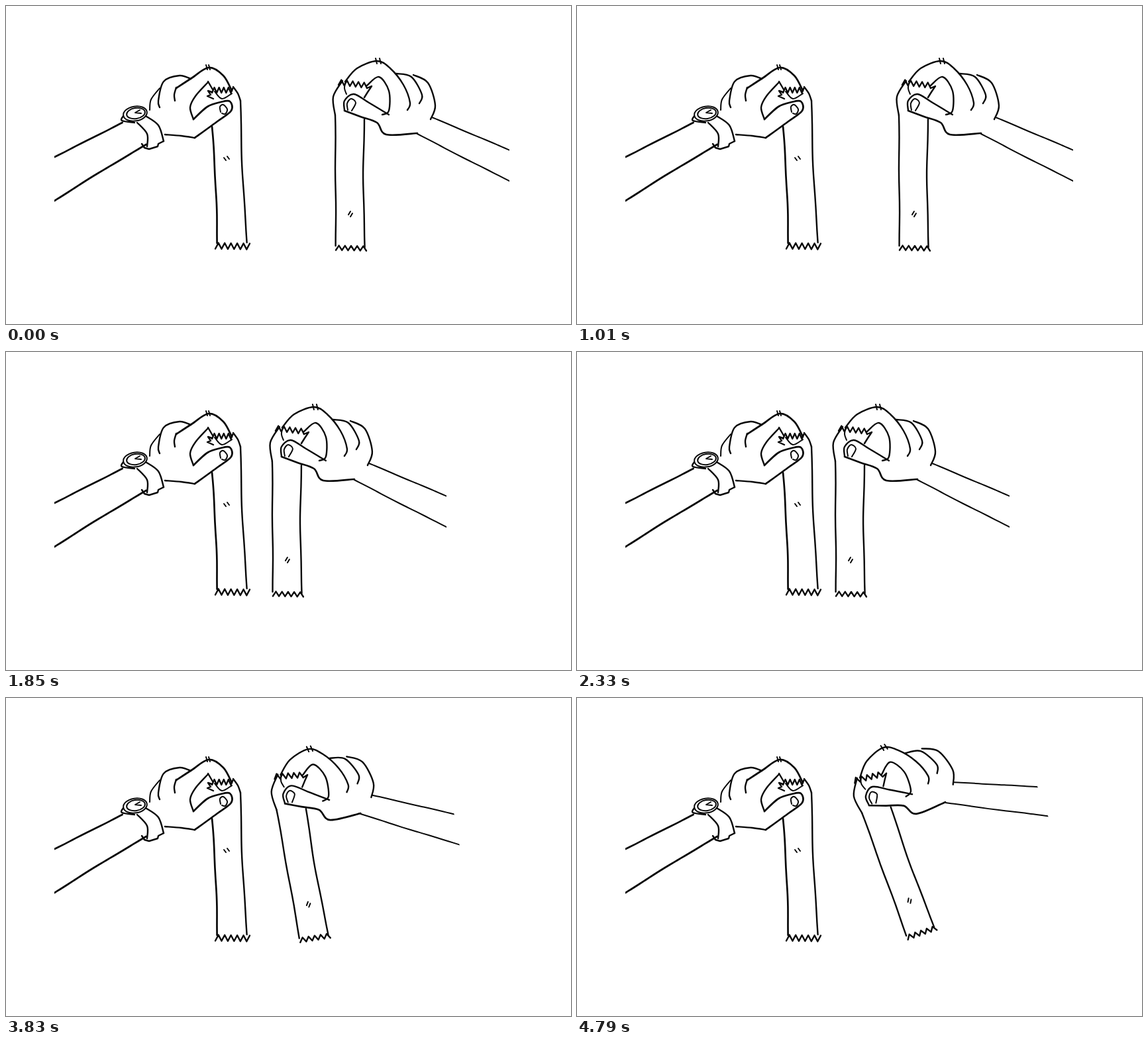
Recreate the animation shown at these times as an HTML page with a canvas. Size 853x480 px, loop 5390 ms.

```html
<!DOCTYPE html>
<html lang="en">
<head>
<meta charset="utf-8">
<title>Two hands, two strips</title>
<style>
  html, body { margin: 0; width: 100%; height: 100%; overflow: hidden; background: #fff; }
  canvas { display: block; }
</style>
</head>
<body>
<canvas id="stage" width="853" height="480"></canvas>
<script>
const ctx = document.getElementById('stage').getContext('2d');
const LOOP = 5390, STEP = 60;
const SLIDE = { start: 530, steps: 31, distance: -107 };
const SWING = { start: 2930, steps: 32, angle: -19.7 * Math.PI / 180, x: 490, y: 222, dx: 53.5, dy: -28.5 };
const BOLD = 2.7, INK = 2.4, FINE = 2;

function stroke(width, trace) {
  ctx.lineWidth = width;
  ctx.beginPath();
  trace();
  ctx.stroke();
}

// Smooth stroke through a few [x, y] points
function curve(width, ...p) {
  const at = i => p[Math.max(0, Math.min(p.length - 1, i))];
  stroke(width, () => {
    ctx.moveTo(...p[0]);
    for (let i = 0; i < p.length - 1; i++) {
      const [a, b, c, d] = [at(i - 1), at(i), at(i + 1), at(i + 2)];
      ctx.bezierCurveTo(b[0] + (c[0] - a[0]) / 6, b[1] + (c[1] - a[1]) / 6,
        c[0] - (d[0] - b[0]) / 6, c[1] - (d[1] - b[1]) / 6, c[0], c[1]);
    }
  });
}

const line = (width, ...points) =>
  stroke(width, () => points.forEach(point => ctx.lineTo(...point)));

const ellipse = (width, x, y, rx, ry) =>
  stroke(width, () => ctx.ellipse(x, y, rx, ry, -.16, 0, Math.PI * 2));

// Nearly straight hand-drawn edge, bowed sideways in the middle
function edge(width, [x0, y0], [x1, y1], bow = 0) {
  const parts = 12;
  curve(width, ...Array.from({ length: parts + 1 }, (_, i) => {
    const t = i / parts;
    return [x0 + (x1 - x0) * t + bow * Math.sin(Math.PI * t) + .4 * Math.sin(11 * t), y0 + (y1 - y0) * t];
  }));
}

// Torn edge with evenly spaced teeth, starting at the low side
function torn([x0, y0], [x1, y1], parts, height) {
  line(INK, ...Array.from({ length: parts + 1 }, (_, i) => {
    const t = i / parts, side = i % 2 ? -.5 : .5;
    return [x0 + (x1 - x0) * t, y0 + (y1 - y0) * t + side * height];
  }));
}

// Two short dashes side by side
function dashes(x, y, dx, dy, gap, rise = 0) {
  for (const k of [0, 1]) {
    line(FINE, [x + k * gap, y + k * rise], [x + k * gap + dx, y + k * rise + dy]);
  }
}

function drawWatch() {
  ellipse(FINE, 195, 162.5, 18, 11);
  ellipse(FINE, 196, 162, 14, 8);
  line(FINE, [202, 157], [195, 161], [204, 162]);
  curve(INK, [177, 166], [175, 173], [194, 176]);
  curve(INK, [211, 166], [230, 180], [238, 204]);
  curve(INK, [198, 176], [213, 193], [213, 212]);
  line(INK, [205, 208], [209, 214], [216, 216], [229, 212], [230, 208], [238, 204]);
}

function drawLeftHand() {
  edge(BOLD, [70, 229.5], [176, 176]);
  edge(BOLD, [70, 296], [212, 209], -2);
  drawWatch();
  // fingers
  curve(FINE, [217, 157], [219, 141], [232, 124]);
  curve(INK, [232, 153], [230, 143], [238, 114], [262, 105], [279, 110]);
  curve(INK, [255, 143], [254, 134], [257, 123]);
  curve(BOLD, [257, 124], [280, 109], [306, 93], [328, 105], [341, 128]);
  dashes(302, 89, 2, 7, 4);
  curve(INK, [305, 115], [286, 136], [278, 153], [283, 171]);
  curve(INK, [305, 114], [312, 126]);
  // thumb
  curve(BOLD, [283, 171], [304, 152], [324, 145], [338, 144], [340, 158], [318, 175], [285, 199]);
  curve(INK, [285, 199], [265, 196], [240, 194]);
  curve(FINE, [324, 160], [323, 152], [328, 149], [334, 156], [331, 163], [326, 162]);
  // strip
  line(INK, [313, 140], [304, 136], [309, 134], [305, 128], [311, 130]);
  torn([311, 127], [343, 127], 9, 8);
  curve(FINE, [315, 129], [326, 140], [341, 132]);
  curve(INK, [343, 122], [350, 132], [354, 143]);
  edge(INK, [354, 143], [364, 357], -2);
  edge(BOLD, [311, 182], [319, 358], 1.5);
  torn([316, 362], [368, 363], 11, 9);
  dashes(329, 229, 3, 4, 5, -2);
}

function drawRightHand() {
  edge(FINE, [643, 168], [764, 219]);
  edge(FINE, [621, 193], [764, 266], -1);
  // fingers
  curve(INK, [512, 114], [530, 94], [560, 83], [580, 94], [600, 119], [610, 146], [606, 157]);
  dashes(558, 79, 2, 8, 6);
  curve(INK, [545, 120], [563, 107], [578, 128], [578, 158], [568, 164]);
  curve(INK, [589, 102], [612, 107], [628, 134], [624, 147]);
  curve(INK, [615, 104], [637, 116], [648, 150], [641, 171]);
  // thumb
  curve(INK, [511, 157], [511, 143], [525, 133], [548, 146], [578, 164]);
  curve(BOLD, [511, 158], [535, 167], [560, 176], [574, 194], [621, 192]);
  curve(FINE, [516, 157], [515, 147], [521, 140], [528, 146], [522, 158]);
  // strip
  torn([502, 115], [545, 120], 10, 8);
  line(INK, [545, 124], [552, 121], [546, 130], [541, 138]);
  curve(FINE, [513, 113], [511, 124], [514, 133]);
  curve(INK, [508, 113], [494, 137], [497, 165]);
  edge(INK, [497, 165], [498, 362]);
  edge(INK, [541, 171], [542, 364], -2);
  torn([498, 365], [544, 366], 10, 7);
  dashes(520, 310, -3, 5, 3, 3);
}

// Timing curve with flat ends, solved by bisection
function ease(u, first, second) {
  let low = 0, high = 1;
  for (let i = 0; i < 24; i++) {
    const s = (low + high) / 2, r = 1 - s;
    const x = 3 * r * r * s * first + 3 * r * s * s * second + s * s * s;
    if (x < u) low = s; else high = s;
  }
  return low * low * (3 - 2 * low);
}

const turnEase = u => .67 * u + .33 * u * u * (3 - 2 * u);

function progress(time, { start, steps }) {
  const count = Math.floor((time - start) / STEP) + 1;
  return Math.max(0, Math.min(steps, count)) / steps;
}

function clipTo(x, width) {
  ctx.beginPath();
  ctx.rect(x, 0, width, 480);
  ctx.clip();
}

function draw(time) {
  ctx.fillStyle = '#fff';
  ctx.fillRect(0, 0, 853, 480);
  ctx.strokeStyle = '#080808';
  ctx.lineCap = ctx.lineJoin = 'round';

  ctx.save();
  clipTo(73, 400);
  drawLeftHand();
  ctx.restore();

  const slide = ease(progress(time, SLIDE), .622, .4615);
  const swing = progress(time, SWING), shift = ease(swing, .54, .46);
  ctx.save();
  ctx.translate(SWING.x + SWING.dx * shift, SWING.y + SWING.dy * shift);
  ctx.rotate(SWING.angle * turnEase(swing));
  ctx.translate(SLIDE.distance * slide - SWING.x, -SWING.y);
  clipTo(440, 320);
  drawRightHand();
  ctx.restore();
}

const begin = performance.now();
function tick() {
  draw((performance.now() - begin) % LOOP);
  requestAnimationFrame(tick);
}
tick();
</script>
</body>
</html>
```
